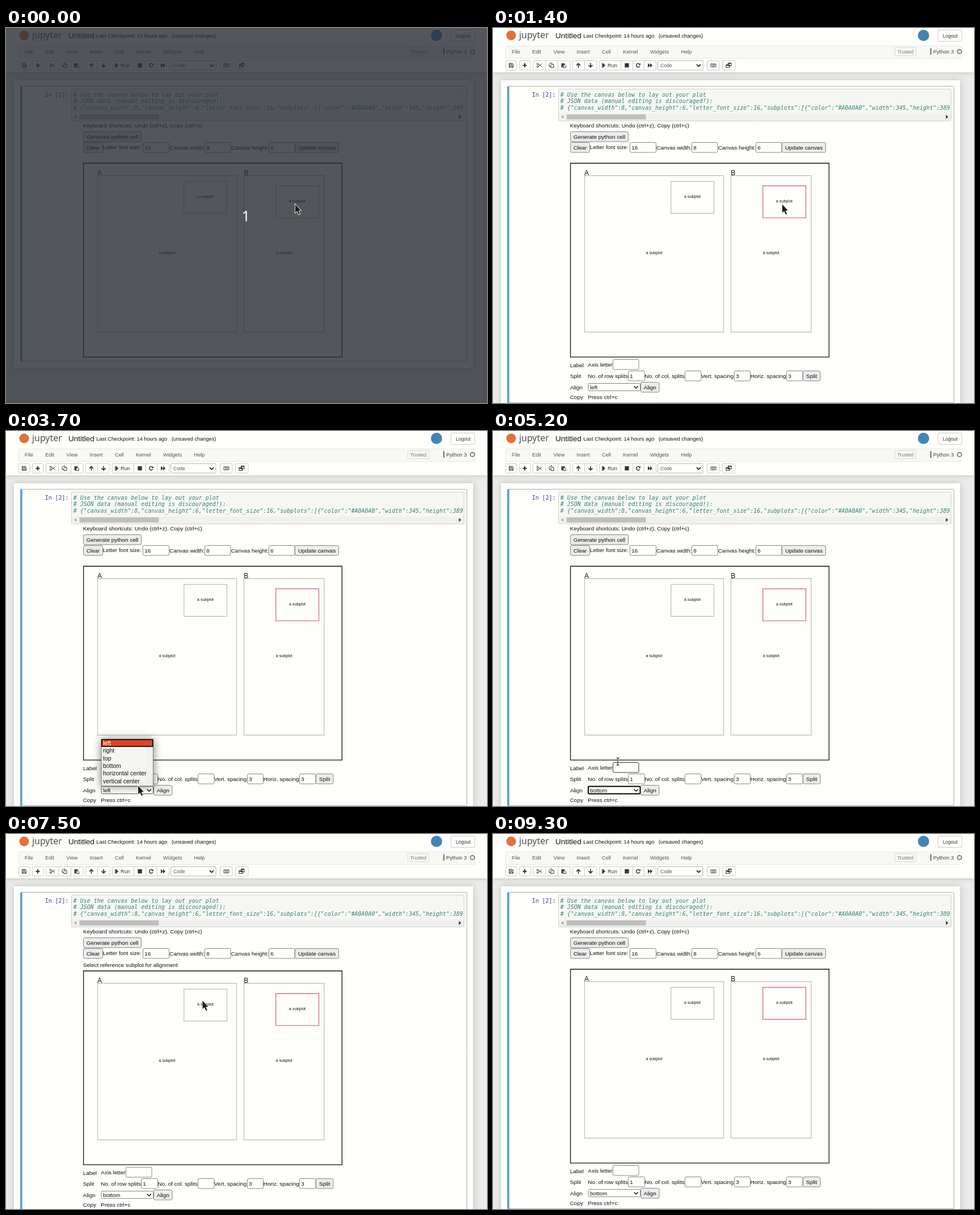
Animation of 848 by 660 pixels, one loop 10 s. Source, as an HTML page with a canvas:

```html
<!DOCTYPE html>
<html lang="en">
<head>
<meta charset="utf-8">
<title>Aligning subplots in a notebook</title>
<style>
  html, body { margin: 0; width: 100%; height: 100%; overflow: hidden; background: #ebecea; }
  canvas { display: block; }
</style>
</head>
<body>
<canvas id="stage" width="848" height="660"></canvas>
<script>
const ctx = document.getElementById('stage').getContext('2d');
const LOOP = 10000, STEP = 100;
const SANS = '"Liberation Sans", Arial, sans-serif';
const MONO = '"DejaVu Sans Mono", monospace';
const WHITE = '#fefffb', INK = '#111', ICON = '#333';
const OPTIONS = ['left', 'right', 'top', 'bottom', 'horizontal center', 'vertical center'];

// ---- drawing helpers ----
function text(str, x, y, { size = 9.94, color = INK, font = SANS, style = '', align = 'left' } = {}) {
  ctx.font = `${style} ${size}px ${font}`;
  ctx.fillStyle = color;
  ctx.textAlign = align;
  ctx.fillText(str, x, y);
}

function box(x1, y1, x2, y2, { fill, stroke, line = 1, radius = 0 } = {}) {
  ctx.beginPath();
  ctx.roundRect(x1, y1, x2 - x1, y2 - y1, radius);
  if (fill) { ctx.fillStyle = fill; ctx.fill(); }
  if (stroke) { ctx.strokeStyle = stroke; ctx.lineWidth = line; ctx.stroke(); }
}

function path(d, { x = 0, y = 0, fill, stroke, line = 1 }) {
  const shape = new Path2D(d);
  ctx.save();
  ctx.translate(x, y);
  if (stroke) { ctx.strokeStyle = stroke; ctx.lineWidth = line; ctx.stroke(shape); }
  if (fill) { ctx.fillStyle = fill; ctx.fill(shape); }
  ctx.restore();
}

function disc(x, y, r, fill) {
  ctx.beginPath();
  ctx.arc(x, y, r, 0, 7);
  ctx.fillStyle = fill;
  ctx.fill();
}

function shadowed(color, blur, draw) {
  ctx.save();
  ctx.shadowColor = color;
  ctx.shadowBlur = blur;
  draw();
  ctx.restore();
}

function button(label, x1, y1, x2, fill = '#ececea') {
  box(x1, y1, x2, y1 + 17.5, { fill, stroke: '#858589', radius: 2.5 });
  text(label, (x1 + x2) / 2, y1 + 12.3, { align: 'center' });
}

function input(value, x1, y1, x2, stroke = '#858589') {
  box(x1, y1, x2, y1 + 17.5, { fill: WHITE, stroke, radius: 2 });
  text(value, x1 + 2.8, y1 + 12.3);
}

const chevron = (x, y) => path('M-3.5 -1.7 L0 1.8 L3.5 -1.7', { x, y, stroke: INK, line: 1.5 });

// ---- timeline ----
// Pointer moves: start time, number of steps, destination.
const MOVES = [
  [2000, 6, 300, 641], [2600, 2, 275, 628], [3100, 3, 233, 624.5],
  [4200, 3, 220, 583], [5700, 1, 241, 613.5], [6000, 1, 272, 627],
  [6800, 8, 346.5, 293.5], [9100, 2, 140, 11],
];

function pointerAt(t) {
  let x = 510, y = 310.5;
  for (const [start, steps, toX, toY] of MOVES) {
    if (t < start) break;
    const u = Math.min(1, (Math.floor((t - start) / STEP) + 1) / steps);
    const eased = u * u * (3 - 2 * u);
    x += (toX - x) * eased;
    y += (toY - y) * eased;
  }
  return { x, y };
}

const between = (t, a, b) => t >= a && t < b;

// ---- page parts ----
function drawHeader(titleHover) {
  shadowed('rgba(87,87,87,.35)', 8, () => box(0, 0, 848, 78, { fill: WHITE }));
  disc(32, 13, 8.5, '#e4703a');
  text('jupyter', 46, 18, { size: 15.9, color: '#4e4e4e', font: '"Noto Sans", sans-serif' });
  if (titleHover) box(109, 6, 157, 22, { fill: '#e4e5e2', radius: 1 });
  text('Untitled', 110, 17.5, { size: 13.5 });
  text('Last Checkpoint: 14 hours ago', 159.3, 17.3, { size: 9.23 });
  text('(unsaved changes)', 292, 17.3, { size: 9.23 });
  disc(759, 13, 10, '#4584b6');
  box(784.5, 3.5, 826.5, 23.5, { fill: WHITE, stroke: '#ccc', radius: 1.5 });
  text('Logout', 806, 16.5, { size: 8.52, color: ICON, align: 'center' });

  box(22.5, 31.5, 827, 53.5, { fill: '#f8f8f5', stroke: '#e7e7e5', radius: 1.5 });
  const menus = { File: 33, Edit: 69, View: 106.5, Insert: 147.5, Cell: 192, Kernel: 229, Widgets: 277, Help: 331.5 };
  for (const [name, x] of Object.entries(menus))
    text(name, x, 45, { size: 9.23, color: '#555' });
  box(708.5, 34.5, 745.5, 48.5, { stroke: '#d8d8d6' });
  text('Trusted', 727, 44.7, { size: 8.52, color: '#777', align: 'center' });
  path('M771.9 35.5 V47', { stroke: ICON, line: 1.4 });
  text('Python 3', 776, 45, { size: 9.23, color: '#444' });
  path('M826 41.5 a3.7 3.7 0 1 1 -7.4 0 a3.7 3.7 0 1 1 7.4 0', { stroke: '#444', line: 1.2 });
  drawToolbar();
}

function drawToolbar() {
  const frame = { stroke: '#cbccca', radius: 1.5 };
  for (const [a, b] of [[22.5, 42], [46.5, 66], [70.5, 136], [140.5, 183], [187.5, 287.5], [377.5, 399], [404.5, 427]])
    box(a, 57.5, b, 74, frame);
  for (const x of [92.5, 114.5, 161.5, 225.5, 246.5, 266.5])
    path(`M${x} 57.5 V74`, { stroke: '#cbccca' });

  const y = 65.7;
  const solid = (d, x) => path(d, { x, y, fill: ICON });
  const line = (d, x, width = 1) => path(d, { x, y, stroke: ICON, line: width });
  line('M-3.5 -3.5 H2 L3.5 -2 V3.5 H-3.5 Z M-2 -3.5 V-1 H1.5 V-3.5 M-2 3.5 V1 H2 V3.5', 32);
  line('M-3.6 0 H3.6 M0 -3.6 V3.6', 56, 2);
  line('M-1.5 -2 L4.5 2.5 M-1.5 2 L4.5 -2.5 M-1.5 -2.3 a1.4 1.4 0 1 0 -2.8 0 a1.4 1.4 0 1 0 2.8 0 M-1.5 2.3 a1.4 1.4 0 1 0 -2.8 0 a1.4 1.4 0 1 0 2.8 0', 81.5);
  line('M-1 2 H-4 V-2 L-2 -4 H1 V-1.5 M-1 0 L.5 -1.7 H4 V4 H-1 Z', 103);
  solid('M-4 -3.5 H2 V-1 H-1 V3.5 H-4 Z', 124.5);
  line('M-.5 -.7 H2.2 L4 1 V4 H-.5 Z', 124.5);
  for (const [x, s] of [[150.5, 1], [172, -1]])
    line(`M0 ${4 * s} V${-3 * s} M-3.5 ${.3 * s} L0 ${-3.2 * s} L3.5 ${.3 * s}`, x, 1.7);
  solid('M-2.8 -4 H-1.3 V4 H-2.8 Z M-1 -4 L3 0 L-1 4 Z', 195);
  text('Run', 202, 69, { size: 9.23, color: ICON });
  solid('M-3.7 -3.7 H3.7 V3.7 H-3.7 Z', 236);
  line('M2.7 1.5 A3.2 3.2 0 1 1 2 -2.4', 256, 1.5);
  solid('M4 -4 V-.5 H.5 Z', 256);
  solid('M-4 -4 L0 0 L-4 4 Z M0 -4 L4 0 L0 4 Z', 277);
  box(290.5, 57.5, 370, 74, { fill: WHITE, stroke: '#b5b6b4', radius: 1 });
  text('Code', 295, 69, { size: 8.6, color: '#555' });
  chevron(362.5, 65.8);
  line('M-4.5 -2.7 H4.5 V2.7 H-4.5 Z M-3.2 -.9 H3.4 M-2.2 1.2 H2.2', 388.5, .9);
  line('M-1 -3.8 H4.5 V1 H-1 Z M-4.5 -1 H1.5 V3.8 H-4.5 Z', 415.5, 1.1);
  solid('M-1 -4.2 H4.5 V-2.6 H-1 Z M-4.5 -1.2 H1.5 V.6 H-4.5 Z', 415.5);
}

function drawCell(cellBottom) {
  shadowed('rgba(87,87,87,.3)', 10, () => box(14, 92, 823.5, cellBottom + 12.5, { fill: WHITE }));
  box(25.5, 102.5, 812.5, cellBottom, { stroke: '#ababa9', radius: 2 });
  box(25, 102.5, 28.7, cellBottom + .5, { fill: '#569fd0', radius: [2, 0, 0, 2] });

  text('In [2]:', 68.7, 121, { color: '#303f9f', font: MONO });
  box(115.5, 107.5, 807.5, 163.5, { fill: '#f6f7f3', stroke: '#cfcfcd', radius: 1.5 });
  const code = [
    '# Use the canvas below to lay out your plot',
    '# JSON data (manual editing is discouraged!):',
    '# {"canvas_width":8,"canvas_height":6,"letter_font_size":16,"subplots":[{"color":"#A0A0A0","width":345,"height":389',
  ];
  ctx.save();
  ctx.beginPath();
  ctx.rect(116, 108, 691, 55);
  ctx.clip();
  code.forEach((str, i) =>
    text(str, 118.8, 121 + i * 11.4, { color: '#358079', font: MONO, style: 'italic' }));
  box(116, 150.5, 807, 162.5, { fill: '#f0f1ee' });
  box(129.5, 152, 269.5, 161, { fill: '#bfc0bd' });
  ctx.restore();
  path('M124 153.2 V159.8 L120.5 156.5 Z', { fill: '#999' });
  path('M798.5 153 V160 L802.5 156.5 Z', { fill: ICON });

  text('Keyboard shortcuts: Undo (ctrl+z), Copy (ctrl+c)', 135.7, 175);
  button('Generate python cell', 136.5, 182.5, 238.5);
  button('Clear', 136.5, 201.5, 170.5);
  text('Letter font size:', 170.8, 213);
  input('16', 241.5, 201.5, 287.5);
  text('Canvas width:', 288, 213.8);
  input('8', 350.5, 201.5, 396);
  text('Canvas height:', 396.7, 213.8);
  input('6', 463.5, 201.5, 509);
  button('Update canvas', 509.5, 201.5, 586.5);
}

function drawPlots(selected, aligned) {
  box(136.6, 238, 592.4, 579.2, { stroke: INK, line: 1.3 });
  const plot = (x1, y1, x2, y2, label, stroke = '#c3c4c1') => {
    box(x1, y1, x2, y2, { stroke, line: 1.4 });
    text('a subplot', (x1 + x2) / 2, label, { size: 7.15, align: 'center' });
  };
  plot(161.5, 259.8, 406.5, 535.3, 398);
  plot(419.5, 259.8, 561, 535.3, 398);
  plot(313.7, 270, 389.5, 326.3, 298.7);
  const top = aligned ? 270 : 277.8;
  plot(475.7, top, 551.5, top + 56.3, top + 28.7, selected ? '#dc7187' : undefined);
  text('A', 161, 259.3, { size: 12 });
  text('B', 419.3, 259.3, { size: 12 });
}

function drawControls(t) {
  text('Label', 135.7, 597);
  text('Axis letter', 167.3, 596);
  input('', 211.5, 583.5, 257, between(t, 5200, 5700) ? '#333' : undefined);
  text('Split', 135.7, 616);
  text('No. of row splits', 167.3, 615.6);
  input('1', 238.5, 603.5, 267.5);
  text('No. of col. splits', 267.6, 615.6);
  input('', 338.5, 603.5, 367);
  text('Vert. spacing', 366.8, 615.6);
  input('3', 425.5, 603.5, 453.5);
  text('Horiz. spacing', 453.8, 615.6);
  input('3', 517.5, 603.5, 546);
  button('Split', 546.5, 603.5, 577);
  text('Align', 135.7, 635.7);
  const focused = between(t, 5200, 6200);
  const stroke = focused ? '#000' : between(t, 3200, 5200) ? '#555' : '#858589';
  box(168, 625.5, 259.5, 638.5, { fill: WHITE, stroke, line: focused ? 2 : 1, radius: 2 });
  text(t < 5200 ? 'left' : 'bottom', 171, 635.6);
  chevron(252.3, 632.2);
  const hover = between(t, 2600, 3200) || between(t, 5700, 6900);
  const pressed = between(t, 6200, 6300);
  button('Align', 260.5, 623.5, 293, pressed ? '#b3b3b5' : hover ? '#d2d2d3' : undefined);
  text('Copy', 135.7, 652.6);
  text('Press ctrl+c', 167.3, 652.6);
}

function drawPopup(t, pointer) {
  const rowTop = i => 542.8 + i * 13.4;
  const active = t < 4200 ? 0 : Math.min(5, Math.floor((pointer.y - 542) / 13.4));
  ctx.save();
  ctx.globalAlpha = t < 3700 ? .6 : 1;
  shadowed('rgba(0,0,0,.45)', 14, () =>
    box(168, 542.5, 259.5, 625, { fill: '#f5f6f3', stroke: '#777' }));
  OPTIONS.forEach((name, i) => {
    if (i === active)
      box(168.8, rowTop(i) + .4, 258.8, rowTop(i) + 12.4, { fill: '#de4526', stroke: '#000', line: 1.5 });
    text(name, 171, rowTop(i) + 9.9, { size: 10.4, color: i === active ? WHITE : INK });
  });
  ctx.restore();
}

function drawPointer(t, { x, y }) {
  if (t >= 9300) return;
  if (between(t, 5200, 5700)) {
    const beam = 'M-2.5 -6.5 H-1 L0 -5.5 L1 -6.5 H2.5 M0 -5.5 V5 M-2.5 6 H-1 L0 5 L1 6 H2.5';
    path(beam, { x, y: y - 1, stroke: '#fff', line: 2.4 });
    path(beam, { x, y: y - 1, stroke: INK, line: 1.2 });
    return;
  }
  path('M0 0 V14.6 L3.3 11.8 L6 17.6 L8.2 16.6 L5.6 10.9 L9.8 10.4 Z',
    { x, y, fill: '#1c1c1e', stroke: '#fff', line: 1.6 });
}

function drawScene(t) {
  const selected = t >= 1400;
  const choosing = between(t, 6500, 8100);
  const shift = choosing ? 3 : 0;
  const pointer = pointerAt(t);

  box(0, 0, 848, 660, { fill: '#ebecea' });
  drawCell(selected ? 659.3 + shift : 586.5);
  drawHeader(between(t, 9200, 9300));
  if (choosing) text('Select reference subplot for alignment', 135.7, 233.5);
  ctx.save();
  ctx.translate(0, shift);
  drawPlots(selected, t >= 8100);
  if (selected) drawControls(t);
  ctx.restore();
  if (between(t, 3600, 5200)) drawPopup(t, pointer);

  if (t < 500) {
    box(0, 0, 848, 660, { fill: 'rgba(40,45,53,.8)' });
    text('1', 423, 340, { size: 25, color: '#fff', font: '"Noto Sans", sans-serif', align: 'center' });
  }
  drawPointer(t, pointer);
}

function tick() {
  drawScene(Math.floor(performance.now() % LOOP / STEP) * STEP);
  requestAnimationFrame(tick);
}
tick();
</script>
</body>
</html>
```
